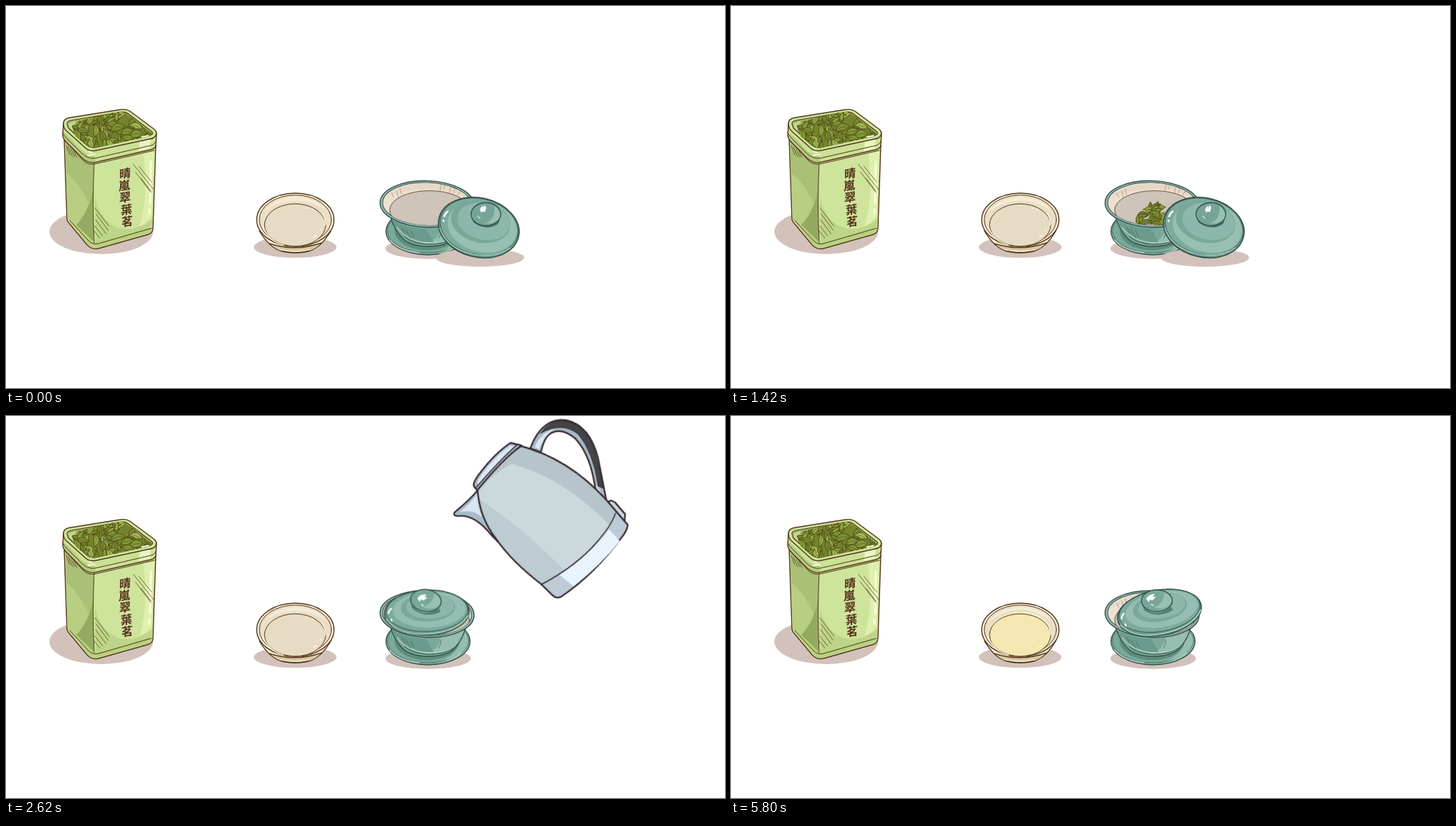
These frames come from a looping animation (1027x545 px, 6700 ms). An HTML page:

```html
<!DOCTYPE html>
<html lang="zh-Hant">
<head>
<meta charset="utf-8">
<title>Brewing tea</title>
<style>
html, body { margin: 0; width: 100%; height: 100%; overflow: hidden; background: #fff; }
svg { display: block; width: 100vw; height: 100vh; }
path, ellipse { stroke-linecap: round; stroke-linejoin: round; }
.shade { fill: #d3c2bb; }
.brown { stroke: #54351a; stroke-width: 1.4; }
.teal { stroke: #35504a; stroke-width: 1.4; }
.steel { stroke: #3a2c32; stroke-width: 2.3; }
.line { fill: none; }
.name { font: 700 16.5px "Noto Sans CJK TC", "Noto Sans CJK", sans-serif; fill: #54301a; text-anchor: middle; }

#tin, #tinShade, #pile, #kettle, #jet, #water, #openLid, #lid, #glint, #gaiwan { animation: 6.7s step-end infinite; }
#tin { animation-name: tin; transform-origin: 170px 239px; }
#tinShade { animation-name: tinShade; }
#pile { animation-name: pile; transform-origin: 602px 314px; }
#kettle { animation-name: kettle; transform-origin: 775px 140px; }
#jet { animation-name: jet; }
#water { animation-name: water; transform-origin: 605px 313px; }
#openLid { animation-name: openLid; }
#lid { animation-name: lid; transform-origin: 612px 280.5px; }
#glint { animation-name: glint; }
#gaiwan { animation-name: gaiwan; transform-origin: 612px 280.5px; }
#tea { animation: tea 6.7s linear infinite; transform-origin: 413px 342.5px; }
#pour { animation: pour 6.7s linear infinite; }
.drop { opacity: 0; animation: drop 6.7s linear infinite; }

@keyframes tin {
  0%, 21.194% { transform: none; }
  10.895% { transform: translate(350.5px, -80px) rotate(74.5deg); }
}
@keyframes tinShade {
  0%, 21.194% { visibility: visible; }
  10.895% { visibility: hidden; }
}
@keyframes drop {
  0%, 12.83% { opacity: 0; transform: none; }
  12.835% { opacity: 1; transform: none; }
  14.4% { opacity: 1; transform: translate(8px, 112px) rotate(50deg); }
  14.41%, 100% { opacity: 0; }
}
@keyframes pile {
  0%, 36.567% { visibility: hidden; transform: scale(.2); }
  13.73% { visibility: visible; transform: scale(.35, .3); }
  14.62% { visibility: visible; transform: scale(.55, .5); }
  15.52% { visibility: visible; transform: scale(.75, .7); }
  16.41% { visibility: visible; transform: scale(.9, .85); }
  17.164% { visibility: visible; transform: none; }
}
@keyframes kettle {
  0%, 40.597% { visibility: hidden; transform: none; }
  22.686%, 39.104% { visibility: visible; transform: translate(-1px, -1px) rotate(10deg); }
  25.223% { visibility: visible; transform: none; }
}
@keyframes jet {
  0%, 36.567% { visibility: hidden; }
  27.164% { visibility: visible; }
}
@keyframes water {
  0%, 36.567% { visibility: hidden; transform: none; }
  27.164% { visibility: visible; transform: scale(.71, .6); }
  30.149% { visibility: visible; transform: scale(.855, .8); }
  33.134% { visibility: visible; transform: none; }
}
@keyframes openLid {
  0% { visibility: visible; }
  36.567% { visibility: hidden; }
}
@keyframes lid {
  0% { visibility: hidden; transform: none; }
  36.567% { visibility: visible; transform: translateX(-11px) rotate(8deg); }
  53.134% { visibility: visible; transform: none; }
}
@keyframes glint {
  0%, 43.134%, 53.134% { transform: none; }
  39.104% { transform: translate(3px, 1px); }
  46.119% { transform: translate(-2px, 1px); }
}
@keyframes gaiwan {
  0%, 86.567% { transform: none; }
  60.149% { transform: translate(-66px, -63px) rotate(-20deg); }
  67.164% { transform: translate(-113px, -76.5px) rotate(-39deg); }
}
@keyframes pour {
  0%, 68.2% { opacity: 0; }
  68.208%, 73.134% { opacity: 1; }
  77.611%, 100% { opacity: 0; }
}
@keyframes tea {
  0%, 68.2% { opacity: 0; transform: scale(.45, .4); }
  68.208%, 73.134% { opacity: 1; transform: scale(.45, .4); }
  77.611%, 100% { opacity: 1; transform: none; }
}
</style>
</head>
<body>
<svg viewBox="0 0 1027 545" preserveAspectRatio="none">
<defs>
  <clipPath id="mouth"><path d="M94 171L104 164L150 153L166 151L177 157L209 183L200 187L130 202Q121 204 114 198L100 186Z"/></clipPath>
  <clipPath id="inside"><ellipse cx="601.5" cy="282.3" rx="63.5" ry="30.5" transform="rotate(2 601 282)"/></clipPath>
  <linearGradient id="jetFill" x1="0" y1="145" x2="0" y2="276" gradientUnits="userSpaceOnUse">
    <stop offset="0" stop-color="#edf6fd" stop-opacity=".7"/>
    <stop offset=".6" stop-color="#e6f2fc" stop-opacity=".9"/>
    <stop offset="1" stop-color="#edf5f6" stop-opacity=".7"/>
  </linearGradient>
</defs>

<!-- tasting cup -->
<g fill="none">
  <ellipse class="shade" cx="413" cy="344" rx="59" ry="15.3"/>
  <path class="brown" fill="#f0e4c8" d="M362 321Q376 345 394 350Q413 354 432 350Q450 345 464 321Z"/>
  <path d="M380 341Q413 350 447 341L441 346Q413 352 387 346Z" fill="#d8c8a2"/>
  <path class="brown" d="M376 339Q413 351 451 338M395 350Q413 354 432 350"/>
  <ellipse class="brown" cx="413.3" cy="305" rx="55.2" ry="38" fill="#f6ecd6"/>
  <ellipse class="brown" cx="413.3" cy="305" rx="51.5" ry="35.3" fill="#eadfc6" style="stroke-width:1"/>
  <path d="M368 294Q382 274 413 272Q445 273 458 293Q441 279 413 278Q386 279 368 294Z" fill="#f4ebd7"/>
  <ellipse cx="413" cy="312.5" rx="43.7" ry="30.3" fill="#e6dcc3"/>
  <g id="tea">
    <ellipse cx="413" cy="309.5" rx="45" ry="33" fill="#e9dfc0"/>
    <ellipse cx="413" cy="312.5" rx="43.5" ry="30" fill="#f4e7b1"/>
    <path d="M374 299Q388 281 418 281Q443 283 453 299" stroke="#faf1c9" stroke-width="3"/>
  </g>
  <ellipse class="brown" cx="413" cy="312.5" rx="43.7" ry="30.3" style="stroke-width:1"/>
  <path d="M367 315Q376 336 396 341M451 295Q457 303 456 313" stroke="#fff8e8" stroke-width="1.4"/>
  <path d="M429 288l3 1M437 290l2 1M440 330l4-3M449 320l1-2" stroke="#fffaf0" stroke-width="1.2"/>
</g>

<!-- saucer -->
<ellipse class="shade" cx="603" cy="346" rx="61" ry="15"/>
<ellipse class="teal" cx="602.8" cy="321.5" rx="60" ry="33.5" fill="#7aa99b"/>
<path d="M616 289Q661 295 661 322Q659 346 615 353Q647 340 648 320Q646 299 616 289Z" fill="#95bdb0"/>
<ellipse cx="601.5" cy="320" rx="46.5" ry="28.5" fill="#5f8b7b"/>
<ellipse class="teal line" cx="602.8" cy="320.5" rx="58" ry="31.5" style="stroke-width:.6"/>
<path d="M548 334Q561 349 590 352M650 338Q643 345 630 349" fill="none" stroke="#b4d4c9" stroke-width="1.3"/>

<!-- lidded bowl -->
<g id="gaiwan">
  <path class="teal" fill="#7aa99b" d="M549 301Q555 320 567 332Q577 342 602 343Q629 343 641 331Q652 319 657 301Z"/>
  <path d="M600 318Q638 317 655 304Q649 324 637 332Q625 338 603 338Q618 332 621 317Z" fill="#96beb1"/>
  <path d="M551 305Q573 318 600 318L611 337Q582 337 569 328Q558 319 551 305Z" fill="#6b9b8c"/>
  <path d="M559 316Q571 334 601 338Q627 338 638 331" fill="none" stroke="#bddbd0" stroke-width="1.3"/>
  <path class="teal line" d="M569 329Q580 339 603 340Q627 340 639 331" style="stroke-width:1"/>
  <path d="M571 319l7 12M578 321l5 9M565 316l5 8M621 320q1 6-3 11" fill="none" stroke="#41685d" stroke-width=".8"/>
  <g transform="rotate(2 601 282)">
    <ellipse class="teal" cx="601.5" cy="282.5" rx="67.2" ry="33.2" fill="#8fb8ab"/>
    <ellipse class="teal" cx="601.5" cy="282.3" rx="63.5" ry="30.5" fill="#eee0cf" style="stroke-width:1"/>
  </g>
  <g clip-path="url(#inside)">
    <path d="M540 275Q562 253 601 253Q640 254 663 276Q636 260 601 261Q564 262 540 275Z" fill="#e6d8c6"/>
    <ellipse cx="605" cy="291" rx="57" ry="27.5" fill="#cec4b8" stroke="#6c5346" stroke-width="1"/>
    <path d="M558 264l3 10M563 261l2 8M551 267l3 6M622 254l-2 9M627 255l-2 6M636 257l-3 10M642 259l-3 8M649 264l-4 6" fill="none" stroke="#a78a75" stroke-width=".8"/>
    <g id="pile"></g>
    <g id="water">
      <ellipse cx="605" cy="293" rx="55" ry="20" fill="#e8e2ba" opacity=".74"/>
      <g id="floating"></g>
      <path d="M557 295Q564 280 589 276M581 308Q593 312 607 311" fill="none" stroke="#f5f1d3" stroke-width="1.5"/>
    </g>
  </g>
  <g id="lid">
    <g transform="rotate(-10 612 280.5)">
      <ellipse class="teal" cx="612" cy="280.5" rx="60.5" ry="32.2" fill="#6f9f91" style="stroke-width:1.7"/>
      <path d="M554 288Q570 312 612 311Q655 310 671 287" fill="none" stroke="#b0d3c8" stroke-width="1.5"/>
      <ellipse class="teal" cx="612.5" cy="278" rx="58.5" ry="29.5" fill="#7cab9d" style="stroke-width:.9"/>
      <ellipse cx="616" cy="276.5" rx="52" ry="25.5" fill="#95bdb1"/>
      <ellipse cx="614" cy="273.5" rx="39" ry="20" fill="#7aa99c"/>
      <ellipse cx="617" cy="272" rx="34" ry="17" fill="#8db7aa"/>
    </g>
    <path d="M558 289q0-4 3-7M563 297l1 2" fill="none" stroke="#fff" stroke-width="2.4"/>
    <path d="M588 270Q604 291 629 272L631 277Q610 290 590 277Z" fill="#527f72"/>
    <ellipse class="teal" cx="608.3" cy="263.5" rx="22" ry="15.5" fill="#79a89a"/>
    <path d="M603 273Q618 270 619 252Q631 257 629 266Q622 278 603 273Z" fill="#98c0b3"/>
    <g id="glint">
      <path d="M593 261Q596 254 605 254L603 258L607 258L602 263L598 262L597 266Z" fill="#f5fffb"/>
      <path d="M600 269l3 1" stroke="#d8ece5" stroke-width="1.5"/>
    </g>
  </g>
</g>

<!-- lid leaning on the bowl -->
<g id="openLid">
  <ellipse class="shade" cx="677" cy="359" rx="63" ry="13"/>
  <g transform="rotate(13 675 316)">
    <ellipse class="teal" cx="675.3" cy="316" rx="58.3" ry="42.2" fill="#6f9f91" style="stroke-width:1.7"/>
    <ellipse class="teal" cx="675.5" cy="314.5" rx="56.5" ry="39.8" fill="#7cab9d" style="stroke-width:.8"/>
    <ellipse cx="680" cy="314" rx="50" ry="36" fill="#97bfb2"/>
    <ellipse cx="676" cy="307" rx="43" ry="30" fill="#79a89a"/>
    <ellipse cx="680" cy="306" rx="38" ry="26" fill="#8db7aa"/>
    <path d="M621 329Q637 355 676 355Q709 353 726 334" fill="none" stroke="#a9cec2" stroke-width="1.2"/>
  </g>
  <path d="M626 300q1-4 5-7M625 306l0 1" fill="none" stroke="#fff" stroke-width="2.6"/>
  <path d="M665 302Q681 325 705 305L703 311Q686 322 668 309Z" fill="#4a7367"/>
  <ellipse class="teal" cx="685.5" cy="297" rx="21.2" ry="16.5" fill="#76a598"/>
  <path d="M684 310Q699 306 698 285Q708 293 705 302Q699 312 684 310Z" fill="#98c0b3"/>
  <path d="M677 291Q678 286 682 285L681 289L684 284L686 288L684 294L681 293L679 295Z" fill="#f8fffc"/>
  <path d="M674 300l3 3" stroke="#d5e9e2" stroke-width="1.3"/>
</g>

<!-- water jet and kettle -->
<g id="jet">
  <path d="M650 145Q631 141 624 162Q609 210 598 272Q612 279 627 274Q629 225 636 176Q638 158 650 154Z" fill="url(#jetFill)"/>
  <path d="M642 149Q631 154 628 176L616 274L624 275Q625 226 634 176Q635 160 644 153Z" fill="#cfe6f8" opacity=".5"/>
</g>
<g id="kettle">
  <path class="steel" fill="#a9b8c8" d="M734 53Q743 6 778 4.500Q812 6 832 50L854 107L837 98Q822 48 795 28Q771 14 757 29Q751 36 750 56Z"/>
  <path fill="#444447" stroke="#2d2a2e" d="M745 29Q755 7 778 6Q811 8 829 48L847 91L839 89Q824 43 798 21Q772 7 745 29Z"/>
  <path d="M740 50Q746 27 763 20Q749 33 747 52ZM835 88L841 93L848 102L840 96Z" fill="#dce8f3"/>
  <path class="steel" fill="#cbd8e4" d="M855 110L861 106L867 108L884 122L885 134L866 124Z"/>
  <path class="steel" fill="#a8bacb" d="M671 124Q662 140 644 161Q641 167 649 166Q671 159 699 183L720 198L708 151Z"/>
  <path d="M671 128Q664 146 650 160Q669 152 684 162Q674 148 671 128Z" fill="#d9e6f1"/>
  <path class="steel" fill="#b5c5ca" d="M721 52Q790 58 852 105L890 136Q891 143 887 151Q856 214 814 254Q808 258 802 254L783 241Q735 216 708 188Q680 163 670 124Q690 80 721 52Z"/>
  <path d="M712 79Q790 87 866 142Q857 164 840 184L812 216Q742 166 677 138Q671 128 673 124Q689 96 712 79Z" fill="#cbd9dd"/>
  <path d="M677 138Q742 166 812 216L785 239Q735 213 708 185Q687 166 677 138Z" fill="#bdccd1"/>
  <path d="M870 124L889 138Q884 158 857 199Q832 235 809 255L785 241Q833 202 853 165Q868 138 870 124Z" fill="#bccbd6"/>
  <path d="M865 147L883 161Q862 200 829 236L806 223Q847 185 865 147Z" fill="#e8f3fd"/>
  <path class="steel line" d="M870 123Q868 140 851 168Q829 206 784 241" style="stroke-width:1.6"/>
  <path class="steel" fill="#aab9c8" d="M705 50L721 51Q698 75 670 125L665 121Q661 118 667 105Q684 70 705 50Z"/>
  <path d="M705 54L711 54Q693 78 670 117Q666 115 671 104Q686 73 705 54Z" fill="#dce8f3"/>
  <path class="steel line" d="M714 52Q692 80 668 121" style="stroke-width:1.5"/>
</g>

<!-- tea caddy -->
<ellipse id="tinShade" class="shade" cx="136" cy="322" rx="74" ry="32"/>
<g id="tin">
  <path class="brown" fill="#cee49b" d="M83 188L87 303Q87 307 91 311L116 341Q123 348 132 346L203 326Q210 324 210 316L214 198L125 215Z"/>
  <path d="M84 192L125 223L125 262Q118 289 99 315L88 303Z" fill="#a9c076"/>
  <path d="M86 238Q103 250 118 282L99 315L88 304Z" fill="#b8cf83"/>
  <path d="M125 258Q119 292 100 313L125 338Z" fill="#93aa60"/>
  <path d="M93 310L101 313L127 338L204 316L209 318L203 325L131 345Q123 346 117 340Z" fill="#b9d181"/>
  <path d="M127 272Q134 309 165 318Q188 321 209 304L208 315L128 338Z" fill="#bdd588"/>
  <path d="M196 210L212 206L208 300Q203 309 191 314Q204 270 196 210Z" fill="#dff0ae"/>
  <path d="M207 222L206 282M205 290L205 296" stroke="#f8fce0" stroke-width="3" fill="none"/>
  <path class="brown line" d="M126 222Q123 280 126 338M91 306L118 335Q124 341 132 339L208 317" style="stroke-width:1"/>
  <path class="line" stroke="#5c4520" stroke-width=".8" d="M86 199l5 13M89 201l6 14M93 204l5 11M97 207l4 9M127 288l20 26M129 297l17 23M128 305l15 20M127 314l11 14M126 321l8 10M182 226l29 36M190 229l18 22M185 237l22 29M193 246l14 18"/>
  <path class="brown" fill="#cbe196" d="M82 168L81 185Q82 190 87 195L108 216Q117 225 128 223L207 205Q214 203 214 198L215 182L123 206Z"/>
  <path d="M82 179L109 207Q117 214 126 212L128 222Q117 224 109 216L83 189Z" fill="#b3cb7e"/>
  <path d="M191 192L207 188L206 203L190 207Z" fill="#e9f5bf"/>
  <path class="brown line" d="M81 181Q83 186 88 190L108 210Q117 219 128 217L207 199Q213 197 214 193M84 192L109 219Q117 228 129 225L212 206" style="stroke-width:1"/>
  <path class="brown" fill="#cde49b" d="M82 168Q82 161 90 159.500L162 148Q171 146 177 150L212 176Q217 181 213 186Q211 189 204 190L129 206Q120 208 114 203L85 177Q82 173 82 168Z"/>
  <path class="brown" fill="#9fb66c" d="M87 168Q87 164 94 163L162 151.500Q170 150 175 154L208 179Q212 183 205 185L130 201.500Q121 203 116 199L89 174Z" style="stroke-width:1.1"/>
  <path d="M89 168L99 164L107 188L91 174Z" fill="#c3da90"/>
  <g clip-path="url(#mouth)"><path d="M90 145H215V206H90Z" fill="#75832c"/><g id="stock"></g></g>
  <path d="M117 213l10-1M119 208l4 1M194 187l9-2" stroke="#f5fbdc" stroke-width="1.8"/>
  <g transform="translate(170 273) skewY(-9)">
    <text class="name" x="0 -1 0 2 3" y="-28 -11 6 24 41">晴嵐翠葉茗</text>
  </g>
</g>

<g id="drops"></g>

<!-- tea poured into the cup -->
<path id="pour" d="M442 243Q437 253 427 260Q410 269 405 289L402 329Q409 335 416 329Q414 293 420 281Q426 268 439 260Z" fill="#f3e6ae" opacity="0"/>
</svg>
<script>
let seed = 11;
const rand = (a, b) => {
  seed = (seed * 16807) % 2147483647;
  return a + (b - a) * seed / 2147483647;
};
const greens = ['#73892d', '#809a35', '#90ac43', '#7b9033', '#a0ba52'];

// A curled leaf: the lower edge may bend towards the upper one.
function leaf(x, y, angle, size, extra = '') {
  const h = size / 2, top = -size * rand(.55, .8), low = size * rand(-.15, .4);
  const fill = greens[Math.floor(rand(0, greens.length))];
  return `<g ${extra}><g transform="translate(${x} ${y}) rotate(${angle})" stroke="#4d4015">
    <path d="M${-h} 0Q0 ${top} ${h} 0Q0 ${low} ${-h} 0Z" fill="${fill}" stroke-width=".8"/>
    <path d="M${-h} 0Q0 ${(top + low) / 2} ${h * .7} 0" fill="none" stroke-width=".45"/></g></g>`;
}
const put = (id, count, make) => {
  document.getElementById(id).innerHTML = Array.from({ length: count }, (_, i) => make(i)).join('');
};

put('stock', 80, i => leaf(rand(94, 209), 150 + i * .65 + rand(-3, 3), rand(-100, 100), rand(14, 22)));

// Heap: narrow at the top, wide at the front.
put('pile', 32, i => {
  const k = i / 31;
  return leaf(603 + rand(-1, 1) * (6 + 22 * k), 286 + 26 * k, rand(-110, 20), rand(13, 19));
});
put('floating', 4, i => leaf(591 - i * 4, 287 + i * 5, i % 2 ? 25 : -60, 9));
put('drops', 14, i => leaf(rand(580, 601), rand(170, 186), rand(0, 180), rand(9, 14),
  `class="drop" style="transform-box:fill-box;transform-origin:center;animation-delay:${i * 13}ms"`));
</script>
</body>
</html>
```
